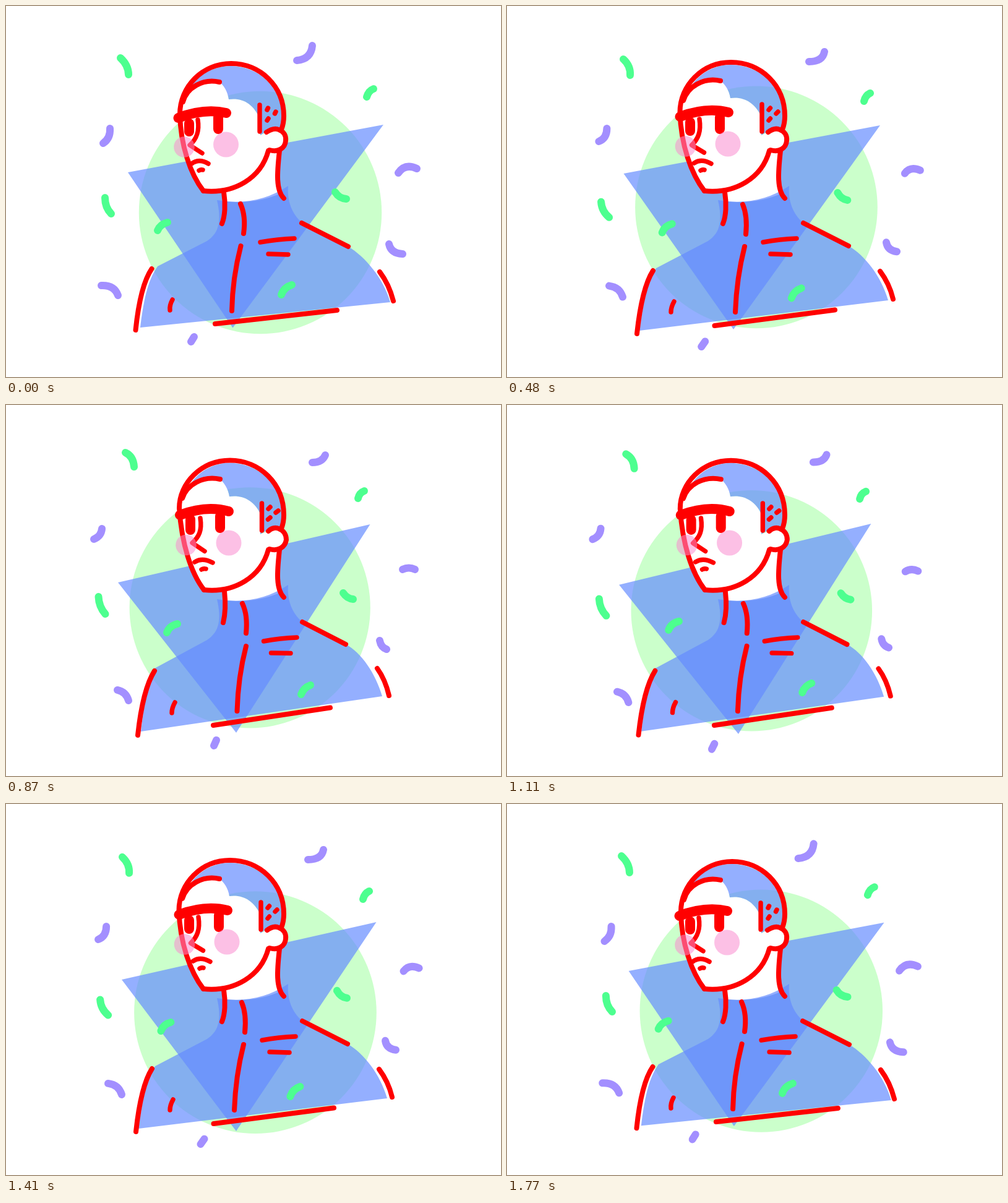
Recreate the animation shown at these times as an HTML page with a canvas. Size 800x600 px, loop 1.8 s.

```html
<!DOCTYPE html>
<html lang="en">
<head>
<meta charset="utf-8">
<title>Portrait with confetti</title>
<style>
html, body { margin: 0; width: 100%; height: 100%; overflow: hidden; background: #fff; }
canvas { display: block; }
</style>
</head>
<body>
<canvas id="stage" width="800" height="600"></canvas>
<script>
const ctx = document.getElementById('stage').getContext('2d');
const LOOP = 1800, STEP = 30, TAU = Math.PI * 2;
const RED = '#f00', BLUE = 'rgba(100,139,255,.69)', PINK = 'rgba(250,140,208,.55)';
const GREEN = '#4dff8f', PURPLE = '#a38fff';

// In paths, "a/m/b" is a coordinate at the start, middle and end of the sway.
const face = `M319/319/320 299 C298/298/299 272 282/281/284 225 281/279.5/280 175/172/167
  C283 145/143/140 305 120/118/117 345/345/346 123/121/120
  C352 128/126/125 358/359/359 138/136/135 360/361/361 151/149/148
  C382 148/146/145 400/401/402 158/156/154 410/411/412 182/179/178
  L411 209 L421/422/424 204 C430 198 437 198 441 200 C449 203 453 210 452 218
  C451 230 446 234 442 234 C438 262 437 285 446 302 Q405 321 354 316 L352 301 Z`;

const hair = `M299 130/128/127 C312 110/108/107 336 97/95/93.5 364/362/362 97/95/93.5
  C410 98/96/95 446 132/130/129 446 180/178/177 L443 200 Q430 196 411 209
  L410/411/412 182/179/178 C400/401/402 158/156/154 382 148/146/145 360/361/361 151/149/148
  C358/359/359 138/136/135 352 128/126/125 345/345/346 123/121/120
  C330 118/116/115 312 122/120/119 299 130/128/127 Z`;

const body = `M341 314 C348 345 346 366 325 380 L245/241/240 421/424/426
  C228/225/227 445/450/453 222/220/223 480/485/488 217/214/218 520/525/528
  L621/616/608 479/476/471 C610/605/597 440/437/434 580/578/575 405/403/401 553/552/549 389/388/387
  L478 350 C462 336 454 315 456 291 Q405 325 341 314 Z`;

const outlines = [
  // head, hairline, jaw, ear
  `M319/319/320 299 C298/298/299 272 282/281/284 225 281/279.5/280 175/172/167
   C281/279.5/280 130/128/126 318/316/316 93/91/89.5 364/362/362 93/91/89.5
   C411/410/410 93/91/89.5 449 130/128/127 449 178 Q449 190 445 200`,
  'M286/285/285 155/153/151 C292 132/130/129 318 117/115/114 345/345/346 123/121/120',
  'M319/319/320 299 C370 304 412 278 424 234',
  'M421/422/424 204 C430 198 437 198 441 200 C449 203 453 210 452/452/453 218 C451 230 440 237 426 233',
  // neck and shoulders
  'M442 234 C438 270 436 298 449 311',
  'M352/352/353 301 C355 320 354 340 349/349/351 352',
  'M478/479/479 351 L553/552/549 389/388/387',
  'M235.5/236/240 425/428/430 Q217/218/221 452/456/460 209.5/210/213 524/530/534',
  'M604/603/600 430/429/426 Q619/618/613 450/449/444 626/624/619 477/474/470',
  // jacket
  'M338/335.5/335 514/517/518 L535/530/524 492/491.5/489.5',
  'M379/381/382 320/321/321 Q388/389/391 340 384/386/388 368/369/369',
  'M379.5/384/388 388/389/390 Q366/371/375 440 365/369/373.5 493/495/495'
];

const details = [
  'M269/270/273 475/478/481 Q264/265/268 484/487/490 265/265/268 492/495/498',
  'M411/414/416.5 382 Q440/441/443 377 466/468/470 376',
  'M424/426/428.5 401 L456/458/460 402/402/401.5',
  'M310/311/314 184/183/183 C313/314/317 203 308/309/312 215/215/213 297/298.5/301 225/225/223 L317/318.5/321 238/237/236.5',
  'M300/302.5/305 255/254/254 Q312/314/317 246 327/330/334 255',
  'M312/313/316 266 Q315/316/319 264 318/319/323 265',
  'M410/412/413.5 160/159/159 L410/412/413.5 203',
  'M423.5/425.5/427 165 L422/423/424 168',
  'M436/438/440 171 L434.5/435/436 174',
  'M424/425.5/427 182 L422/423/423.5 185'
];

const bold = [
  'M278.5/279.5/281 181/179/178 Q320/322/324 165/163/161.5 356/358/360 173/172/172',
  'M296/296/298 190/188/185 L296/296/298 203/202/202',
  'M343/344/346 180 L343/344/346 199'
];

// colour, path, flutter offset x, y
const confetti = [
  [GREEN, 'M185/188/193 84/86/77 Q198/200/206 96/97/83 198/199/207 111/112/100', 0, .5],
  [PURPLE, 'M470/488/495 88/90/93 Q493/510/511 86/90/93 495/513/516 64/74/81', 0, 0],
  [GREEN, 'M583/577/569 147/154/151 Q586/579/571 137/145/142 594/587/579 134/141/139', 0, 0],
  [PURPLE, 'M168/161/155 198/198/200 Q169/161/154 214/214/212 157/148/142 222/219/217', -3.5, 0],
  [PURPLE, 'M634/643/641 270/271/266 Q645/652/651 254/259/261 664/668/661 263/266/266', 1.5, 2],
  [GREEN, 'M160/152/149.5 310/317/310 Q160/153/150 326/332/326 170/165/160.5 336/342/338', -.5, 1.5],
  [GREEN, 'M245/251/260 363/366/368 Q249/255/264 353/355/357 261/267/277 350/352/354', 2, -3.3],
  [GREEN, 'M532/534/545 301/302/304 Q538/540/551 311/313/313 550/550/561 312/314/314', -3, .5],
  [PURPLE, 'M619/613/604 385/382/381 Q622/615/606 400/395/392 641/630/615 401/397/395', 0, -2.3],
  [PURPLE, 'M154/165/180 452/453/461 Q175/182/194 451/455/464 181/187/198 468/471/478', 0, 3.5],
  [GREEN, 'M445/460/477 467/472/468 Q449/464/481 455/460/457 462/476/492 451/456/453', 2, -3.3],
  [PURPLE, 'M304/320/340 535/543/542 L299/314/336 543/551.5/551', -1.7, 4.3]
];

// per corner: three sway keys and a swing amount for x, then for y
const corners = [
  [197.1, 187.75, 180.8, .75, 268, 277.5, 288.7, -6.5],
  [610.3, 600.75, 587.9, 2.25, 192.1, 192, 192.7, 1],
  [366, 369, 372.8, -3, 520, 526, 530.8, -3]
];

function draw(t) {
  const angle = TAU * (t - 45) / LOOP, swing = Math.sin(angle);
  const sway = ((1 - Math.cos(angle)) / 2 - .006) / .977;
  const flutter = Math.sin(2 * TAU * t / LOOP) + .2 * sway;

  const mix = (a, m, b) =>
    a + (b - a) * sway + (m - a - (b - a) * .479) * 4 * sway * (1 - sway);
  const shape = d => new Path2D(d.replace(/([\d.]+)\/([\d.]+)\/([\d.]+)/g,
    (_, a, m, b) => mix(+a, +m, +b).toFixed(2)));
  const fill = (color, path) => { ctx.fillStyle = color; ctx.fill(path); };
  const stroke = (color, width, d) => {
    ctx.strokeStyle = color;
    ctx.lineWidth = width;
    ctx.stroke(shape(d));
  };
  const disc = (color, x, y, r) => {
    const path = new Path2D();
    path.arc(x, y, r, 0, TAU);
    fill(color, path);
  };

  ctx.fillStyle = '#fff';
  ctx.fillRect(0, 0, 800, 600);
  ctx.lineCap = ctx.lineJoin = 'round';

  disc('#cbffcb', 402.5 + 8.6 * Math.cos(angle),
    331.2 - 6.2 * Math.sin(TAU * (t - 135) / LOOP), 196.2 - 1.6 * sway * sway);

  const triangle = new Path2D();
  for (const [xa, xm, xb, xs, ya, ym, yb, ys] of corners)
    triangle.lineTo(mix(xa, xm, xb) + xs * swing, mix(ya, ym, yb) + ys * swing);
  fill(BLUE, triangle);

  fill('#fff', shape(face));
  fill(BLUE, shape(hair));
  fill(BLUE, shape(body));

  outlines.forEach(d => stroke(RED, 8, d));
  details.forEach(d => stroke(RED, 7.4, d));
  bold.forEach(d => stroke(RED, 16, d));

  disc(PINK, mix(355.5, 357, 360), mix(224, 223, 223), 20.5);
  disc(PINK, mix(288, 288.5, 291), mix(228, 227, 226.5), 16.8);

  for (const [color, d, dx, dy] of confetti) {
    ctx.save();
    ctx.translate(dx * flutter, dy * flutter);
    stroke(color, 12, d);
    ctx.restore();
  }
}

const start = performance.now();
function tick() {
  const t = (performance.now() - start) % LOOP;
  draw(Math.floor(t / STEP) * STEP);
  requestAnimationFrame(tick);
}
tick();
</script>
</body>
</html>
```
